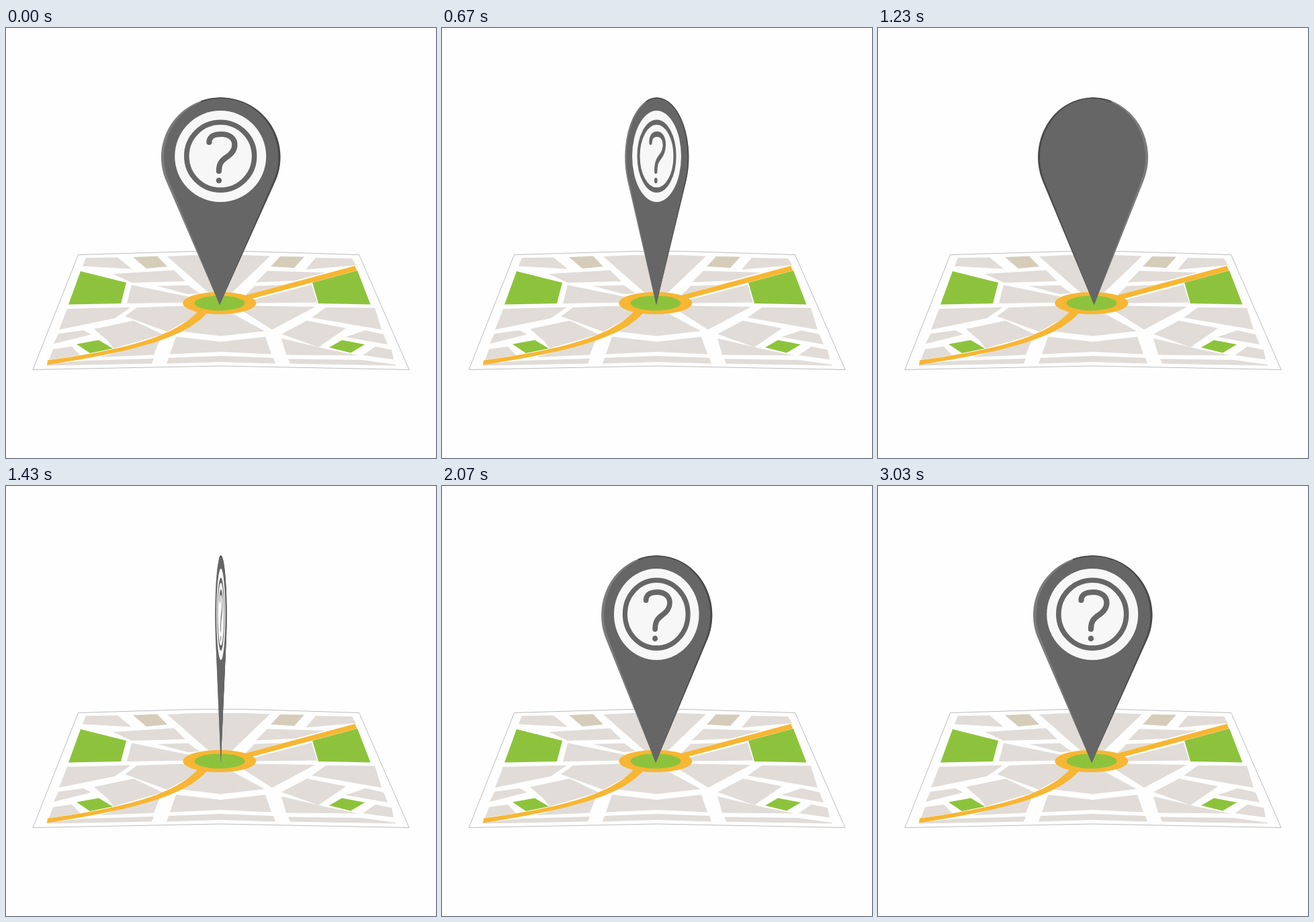
Recreate the animation shown at these times as an HTML page. Size 640 by 640 pixels, loop 6010 ms.

```html
<!DOCTYPE html>
<html lang="en">
<head>
<meta charset="utf-8">
<title>Spinning map pin</title>
<style>
html, body { margin: 0; height: 100%; overflow: hidden; background: #fefefe; }
svg { display: block; width: 100%; height: 100%; }
</style>
</head>
<body>
<svg viewBox="0 0 640 640">
  <path d="M107.5 337.5L285 332.3H358L525.5 337.5L600 508.5L320 503L40 508.5Z" fill="#fefefe" stroke="#bcbcbc"/>
  <g fill="#e1dcd7">
    <path d="M119 342L166 341.500L187 358.500L114 354.500Z"/>
    <path d="M159 366L250 360.500L267 377L187 379Z"/>
    <path d="M225 384L271 383L288 395L270 396Z"/>
    <path d="M187 382.500L272 400L264 408.500L180 410Z"/>
    <path d="M240 340L284 338H355L393 339.500L334 396H304Z"/>
    <path d="M461 342L515 343L521 353L446 359.500Z"/>
    <path d="M389 361.500L475 364L430 376L372 378.500Z"/>
    <path d="M370 384L412 382.500L356 398Z"/>
    <path d="M366 405L455 382L463 408.500L370 409.500Z"/>
    <path d="M91 418L186 415.500L162 432L79 449Z"/>
    <path d="M195 416L266 413.500L290 424L240 452L177 429Z"/>
    <path d="M300 423L335 424L385 451L320 458.500L255 451Z"/>
    <path d="M352 421L371 413.500L460 415L396 449Z"/>
    <path d="M476 416L549 416.500L559 449L455 431Z"/>
    <path d="M78 455L115 450L127 456L71 470Z"/>
    <path d="M131 448L190 435.500L233 456L160 477L152 466Z"/>
    <path d="M70 478L98 474L110 487L64 494Z"/>
    <path d="M448 435.500L506 447L465 475L410 455.500Z"/>
    <path d="M535 450L562 456L568 471L505 460Z"/>
    <path d="M550 474L574 479L577 493.500L531 487Z"/>
    <path d="M231 458L220 486.500L140 490L180 478Z"/>
    <path d="M253 459.500L320 467L386 459.500L395 485.500L320 482L244 485.500Z"/>
    <path d="M410 462L478 478L525 487.500L417 486.500Z"/>
    <path d="M120 495L220 492L217 499.500L61 502.500V500Z"/>
    <path d="M242 491L320 488L398 491L401 499.500L320 497L239 499.500Z"/>
    <path d="M420 492.500L530 494L580 501V502.500L423 499.500Z"/>
  </g>
  <g fill="#d6ccba">
    <path d="M189 341L225 339.500L240 355L209 358Z"/>
    <path d="M408 340L444 340.500L429 357L394 355Z"/>
  </g>
  <g fill="#8dc33c">
    <path d="M111 362L179 379L171 410L93 411.500Z"/>
    <path d="M456 379L523 361L542.500 411.500L465 410Z"/>
    <path d="M105 470.500L138 464.500L159 477L125 484Z"/>
    <path d="M500 464.500L534 471L513 483.500L481 475.500Z"/>
  </g>
  <g fill="#f7b633">
    <path d="M62 494.500C150 482 250 465 288 419L303 420C270 460 200 480 61 501.500Z"/>
    <path d="M350 399.500L519.500 354L522 361L358 405Z"/>
    <ellipse cx="317.800" cy="409.500" rx="54.500" ry="16.600"/>
  </g>
  <ellipse cx="318" cy="409.500" rx="37.500" ry="11" fill="#8dc33c"/>

  <!-- pin, drawn around its vertical axis -->
  <g id="pin">
    <path d="M-2 412L-81.200 228.500A88.700 88.700 0 1 1 80.900 228Z" fill="#7c7c7c"/>
    <path d="M-2 412L80.900 228A88.700 88.700 0 0 0 -30 108.500Z" fill="#494949"/>
    <path d="M-2 412L-77 228.500A85 87.500 0 1 1 78.500 227Z" fill="#666"/>
    <g id="face" fill="none" stroke="#666">
      <circle cx="-.7" cy="191" r="68" fill="#f7f7f7" stroke="none"/>
      <circle cx="-.7" cy="190.700" r="50.400" stroke-width="7.600"/>
      <path d="M-17.500 170C-17.500 161 -9 158 .5 158C13 158 20.500 164.500 20.500 174C20.500 183 15 188 8 192.500C0 198 -3 203 -3 213" stroke-width="8.200" stroke-linecap="round"/>
      <circle cx="-3" cy="227" r="4.300" fill="#666" stroke="none"/>
    </g>
  </g>
</svg>
<script>
const pin = document.getElementById('pin');
const face = document.getElementById('face');
const LOOP = 6010;

// 25 steps per second, shown on a 30 Hz clock
const stepAt = ms => Math.ceil(Math.floor((ms + 5) * 0.03) * 5 / 6 - 0.5);

// one accelerating turn, then two that slow to a stop
function turnsAt(k) {
  if (k < 41) return (Math.max(0, k - 1) / 40) ** 2;
  const left = Math.max(0, 76 - k) / 35;
  return 3 - 2 * left * left;
}

function draw(now) {
  const width = Math.cos(2 * Math.PI * turnsAt(stepAt(now % LOOP)));
  pin.setAttribute('transform', `translate(319.9 0) scale(${width.toFixed(5)} 1)`);
  face.style.display = width > 0 ? '' : 'none';
}

let start;
function tick(now) {
  start ??= now;
  draw(now - start);
  requestAnimationFrame(tick);
}
draw(0);
requestAnimationFrame(tick);
</script>
</body>
</html>
```
